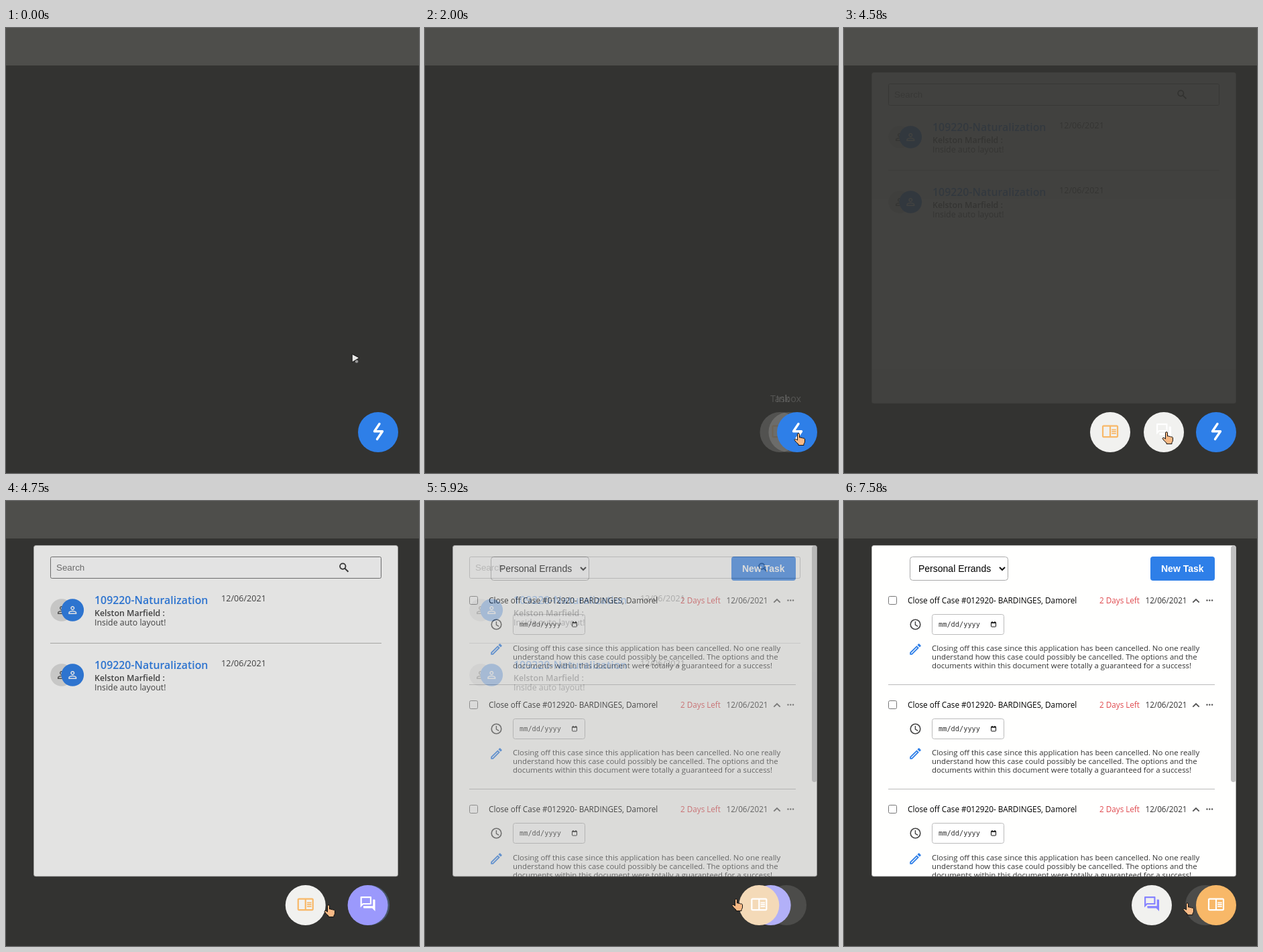
Animation, 616 px wide and 665 px high, one loop 8 s. Source, as an HTML page:

```html
<!DOCTYPE html>
<html lang="en">
<head>
<meta charset="utf-8">
<title>Quick actions</title>
<style>
html, body { margin: 0; width: 100%; height: 100%; overflow: hidden; background: #333331; }
svg { display: block; }
text { font-family: "Open Sans", "Noto Sans", sans-serif; white-space: pre; }
.ui { font-family: "Liberation Sans", Arial, sans-serif; }
.mono { font-family: "DejaVu Sans Mono", monospace; }
</style>
</head>
<body>
<svg width="616" height="665" viewBox="0 0 616 665">
  <clipPath id="clip"><rect x="41" y="66" width="544" height="495.5" rx="3"/></clipPath>
  <rect width="616" height="665" fill="#333331"/>
  <rect width="616" height="56" fill="#4e4e4b"/>
  <g id="inbox" clip-path="url(#clip)"></g>
  <g id="tasks" clip-path="url(#clip)"></g>
  <g id="fabs"></g>
  <g id="cursor">
    <g id="arrow">
      <circle cx="8" cy="12.3" r="2.6" fill="#999" stroke="#222" stroke-width=".6"/>
      <path d="M1.2 1.2 12 7 1.2 13.5z" fill="#e8e8e6" stroke="#111"/>
    </g>
    <path id="hand" fill="#f8b985" stroke="#111" d="M5.5 11V2.2Q5.5.7 7 .7T8.5 2.2V7Q10 6.2 11 7.4 12.5 6.8 13.5 8 15.5 7.6 16.5 9V13Q16.5 15 15 16.5V18.5H7V17Q3 14 1 10.5 1.5 8.8 3.2 9.3Z"/>
  </g>
</svg>
<script>
const LOOP = 8000, FPS = 12;
const BLUE = [46, 127, 232], GREY = [76, 76, 74], PALE = [241, 241, 239],
      VIOLET = [134, 131, 255], AMBER = [248, 184, 104], WHITE = [255, 255, 255];
const ICON = {
  chat: 'M15 4v7H5.17L4 12.17V4h11m1-2H3c-.55 0-1 .45-1 1v14l4-4h10c.55 0 1-.45 1-1V3c0-.55-.45-1-1-1zm5 4h-2v9H6v2c0 .55.45 1 1 1h11l4 4V7c0-.55-.45-1-1-1z',
  reader: 'M21 4H3c-1.1 0-2 .9-2 2v13c0 1.1.9 2 2 2h18c1.1 0 2-.9 2-2V6c0-1.1-.9-2-2-2zM3 19V6h8v13H3zm18 0h-8V6h8v13zm-7-9.5h6V11h-6zm0 2.5h6v1.5h-6zm0 2.5h6V16h-6z',
  person: 'M12 5.9a2.1 2.1 0 1 1 0 4.2 2.1 2.1 0 0 1 0-4.2m0 9c2.97 0 6.1 1.46 6.1 2.1v1.1H5.9V17c0-.64 3.13-2.1 6.1-2.1M12 4C9.79 4 8 5.79 8 8s1.79 4 4 4 4-1.79 4-4-1.79-4-4-4zm0 9c-2.67 0-8 1.34-8 4v3h16v-3c0-2.66-5.33-4-8-4z',
  pencil: 'M14.06 9.02l.92.92L5.92 19H5v-.92l9.06-9.06M17.66 3c-.25 0-.51.1-.7.29l-1.83 1.83 3.75 3.75 1.83-1.83c.39-.39.39-1.02 0-1.41l-2.34-2.34c-.2-.2-.45-.29-.71-.29zm-3.6 3.19L3 17.25V21h3.75L17.81 9.94l-3.75-3.75z'
};
const $ = id => document.getElementById(id);
const rgb = c => `rgb(${c.map(Math.round)})`;
const lerp = (a, b, p) => a + (b - a) * p;
const mix = (a, b, p) => a.map((v, i) => lerp(v, b[i], p));
const clamp = v => Math.max(0, Math.min(1, v));

// CSS "ease" curve: cubic-bezier(.25, .1, .25, 1)
function ease(x) {
  if (x <= 0 || x >= 1) return clamp(x);
  const bez = (a, b, s) => 3 * a * s * (1 - s) ** 2 + 3 * b * s * s * (1 - s) + s ** 3;
  let lo = 0, hi = 1;
  for (let i = 0; i < 20; i++) {
    const m = (lo + hi) / 2;
    if (bez(.25, .25, m) < x) lo = m; else hi = m;
  }
  return bez(.1, 1, lo);
}

const text = (x, y, size, fill, str, more = '') =>
  `<text x="${x}" y="${y}" font-size="${size}" fill="${fill}" ${more}>${str}</text>`;
const box = (x, y, w, h, r, fill, stroke = 'none') =>
  `<rect x="${x}" y="${y}" width="${w}" height="${h}" rx="${r}" fill="${fill}" stroke="${stroke}"/>`;
const disc = (x, y, r, fill) => `<circle cx="${x}" cy="${y}" r="${r}" fill="${fill}"/>`;
const line = (d, stroke, width = 1) =>
  `<path d="${d}" fill="none" stroke="${stroke}" stroke-width="${width}"/>`;
const icon = (name, x, y, scale, fill) =>
  `<path d="${ICON[name]}" fill="${fill}" transform="translate(${x} ${y}) scale(${scale}) translate(-12 -12)"/>`;
const panel = box(41.5, 66.5, 543, 494.5, 3, '#fffffe', '#b4b4b2');

function inboxRow(i) {
  const y = 97 * i, blue = rgb(BLUE);
  return `<g transform="translate(0 ${y})">` +
    disc(83, 163, 16.8, '#dededd') + icon('person', 83, 163, .75, '#555') +
    disc(99.3, 163, 16.8, blue) + icon('person', 99.3, 163, .75, '#fff') +
    text(132, 153.5, 15.9, blue, '109220-Naturalization', 'font-weight="600"') +
    text(321, 150, 12.6, '#444', '12/06/2021') +
    text(132, 172, 12.4, '#444', 'Kelston Marfield :', 'font-weight="600"') +
    text(132, 186, 12.4, '#444', 'Inside auto layout!') + '</g>';
}

function taskRow(i) {
  const d = i > 1 ? 1 : 0;
  const note = ['Closing off this case since this application has been cancelled. No one really',
    'understand how this case could possibly be cancelled. The options and the',
    'documents within this document were totally a guaranteed for a success!'];
  return `<g transform="translate(0 ${156 * i})">` +
    box(66.5, 142.5, 12, 12, 2, '#fff', '#767676') +
    text(95, 153, 11.75, '#000', 'Close off Case #012920- BARDINGES, Damorel') +
    text(381, 153, 11.7, '#e04a4f', '2 Days Left') +
    text(449.5, 153, 11.7, '#333', '12/06/2021') +
    line('M520.3 151.7 525 147l4.7 4.7', '#555', 1.8) +
    [541.5, 545.3, 549.1].map(x => disc(x, 148.5, 1.2, '#555')).join('') +
    `<circle cx="106.5" cy="184.5" r="7.3" fill="none" stroke="#444" stroke-width="1.6"/>` +
    line('M106.4 180v5l3.8 2.4', '#444', 1.4) +
    box(131.5, 169.5, 107, 30, 3, '#fff', '#bbb') +
    text(141, 188, 10.3, '#333', 'mm/dd/yyyy', 'class="mono"') +
    box(219.5, 181.5, 7, 6.5, 1, '#fff', '#111') + line('M219 182h8M221 180v2M225 180v2', '#111', 1.4) +
    icon('pencil', 106.5, 221.5 + d, .92, rgb(BLUE)) +
    note.map((s, n) => text(131, 224 + 13 * n + d, 11.4, '#333', s)).join('') +
    line('M66 274.5H553', '#bbb') + '</g>';
}

$('inbox').innerHTML = panel + box(66.5, 83.5, 493, 32, 2, '#fff', '#767676') +
  text(75, 104, 13.33, '#757575', 'Search', 'class="ui"') +
  `<circle cx="502.3" cy="97.6" r="4.2" fill="none" stroke="#333" stroke-width="1.8"/>` +
  line('M505.3 100.6 510.5 105.8', '#333', 2) +
  inboxRow(0) + line('M66 212.5H560', '#b8b8b6') + inboxRow(1);

$('tasks').innerHTML = panel + box(98.5, 83.5, 146, 35, 4, '#fff', '#aaa') +
  text(111, 106, 14, '#000', 'Personal Errands', 'class="ui"') +
  line('M232 99l4 4 4-4', '#111', 2) +
  box(457, 83, 96, 36, 4, rgb(BLUE)) +
  text(473, 106, 14, '#fff', 'New Task', 'class="ui" font-weight="700"') +
  [0, 1, 2].map(taskRow).join('') + box(577, 67, 7.5, 353, 3.7, '#c1c1c1');

// Cursor stops: time, x, y
const STOPS = [[0, 515, 486], [167, 518, 486], [250, 518, 486], [830, 563, 594], [1083, 551, 595],
  [1333, 550, 605], [2833, 550, 605], [3500, 474, 603], [5167, 474, 603], [5333, 457, 594],
  [7083, 457, 594], [7583, 505, 600], [8000, 505, 600]];

function cursorAt(t) {
  const n = Math.max(1, STOPS.findIndex(s => s[0] >= t));
  const a = STOPS[n - 1], b = STOPS[n];
  const u = clamp((t - a[0]) / (b[0] - a[0])), p = u * u * (3 - 2 * u);
  return [lerp(a[1], b[1], p), lerp(a[2], b[2], p)];
}

function button(name, x, fill, ink, label, alpha, labelAlpha) {
  return `<g opacity="${alpha}">` + disc(x, 604, 30, rgb(fill)) +
    icon(name, x, name === 'chat' ? 602 : 602.3, 1.1, rgb(ink)) +
    text(x, 559, 14.3, '#fff', label, `text-anchor="middle" opacity="${labelAlpha}"`) + '</g>';
}

function draw(t) {
  const open = ease((t - 1960) / 290);
  const chat = ease((t - 4583) / 334);
  const swap = ease((t - 5833) / 334);
  const labels = clamp((4583 - t) / 166);

  const chatX = lerp(lerp(lerp(555, 477, open), 555, chat), 459, swap);
  const readerX = lerp(lerp(lerp(555, 397, open), 459, chat), 555, swap);
  const chatOn = t > 4490 && t < 5825, readerOn = t > 5850;
  const chatBtn = button('chat', chatX, mix(PALE, VIOLET, chat * (1 - swap)),
    chatOn ? WHITE : VIOLET, 'Inbox', open, labels);
  const readerBtn = button('reader', readerX, mix(PALE, AMBER, swap),
    readerOn ? WHITE : AMBER, 'Task', open, labels);
  const x = lerp(555, 539, chat);
  const main = disc(x, 604, 30, rgb(mix(BLUE, GREY, chat))) +
    `<path d="M${x + 2} 591.5l-7.5 11.3h12l-8 11.7" fill="none" stroke="#fff" stroke-width="3.4"
      stroke-linecap="round" stroke-linejoin="round" opacity="${1 - chat}"/>`;
  $('fabs').innerHTML = (t < 4490 ? [readerBtn, chatBtn, main]
    : t < 5825 ? [main, readerBtn, chatBtn] : [main, chatBtn, readerBtn]).join('');

  $('inbox').setAttribute('opacity', ease((t - 4555) / 340) * (1 - swap));
  $('tasks').setAttribute('opacity', t > 5850 ? ease((t - 5805) / 340) : 0);

  const [cx, cy] = cursorAt(t), over = cy > 568;
  $('cursor').setAttribute('transform', `translate(${cx} ${cy})`);
  $('arrow').setAttribute('opacity', over ? 0 : 1);
  $('hand').setAttribute('opacity', over ? 1 : 0);
}

let last = -1;
const start = performance.now();
function tick(now) {
  const t = Math.max(0, now - start) % LOOP;
  const step = Math.floor((t + 3.4) * FPS / 1000) % (LOOP * FPS / 1000);
  if (step !== last) draw((last = step) * 1000 / FPS);
  requestAnimationFrame(tick);
}
tick(start);
</script>
</body>
</html>
```
